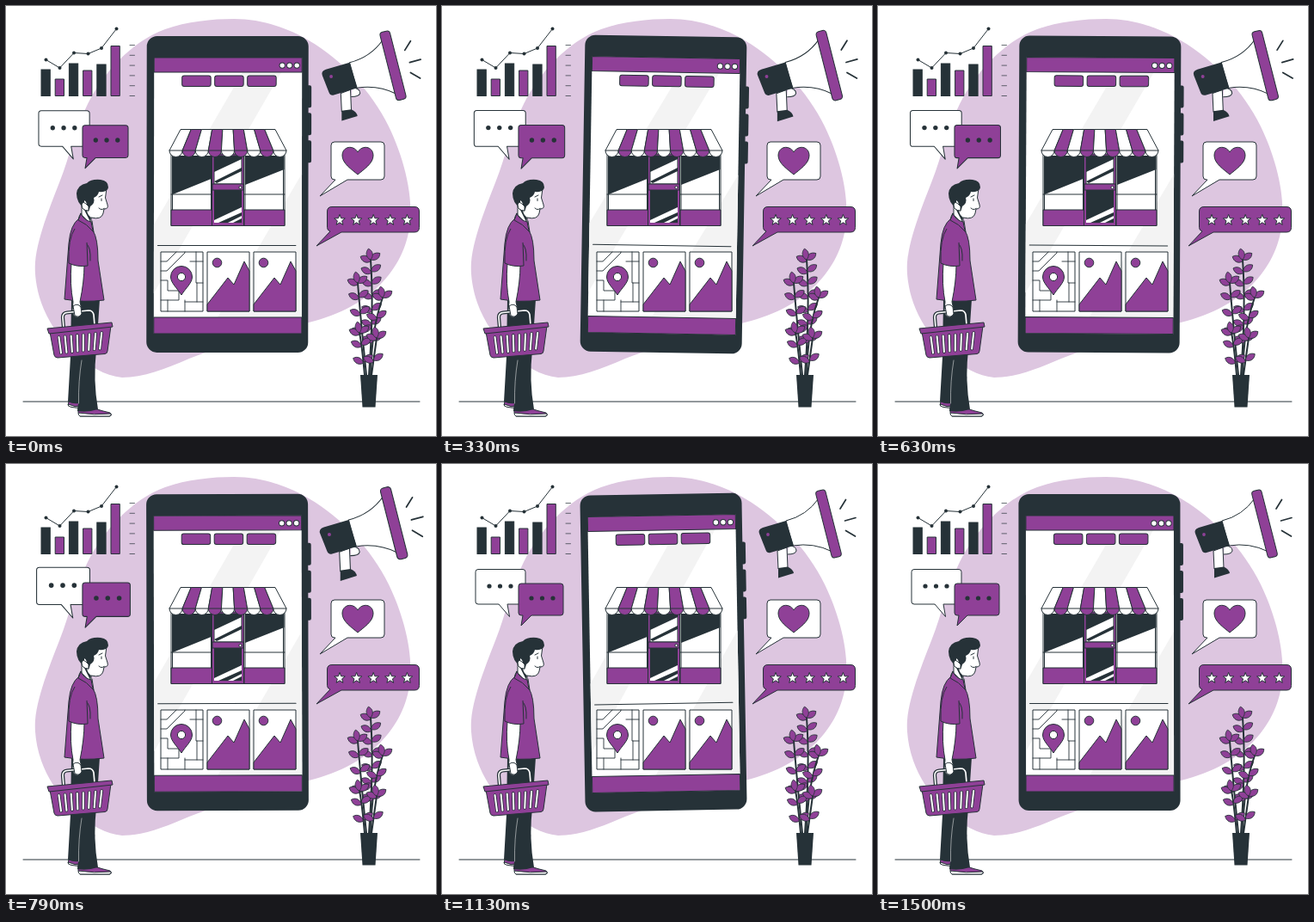
These frames come from a looping animation (500 px wide and 500 px high, 1.54 s). An HTML page:

```html
<!DOCTYPE html>
<html lang="en">
<head>
<meta charset="utf-8">
<title>Mobile shopping</title>
<style>
html, body { margin: 0; width: 100%; height: 100%; overflow: hidden; background: #fff; }
svg { display: block; width: 100vw; height: 100vh; }
.l { fill: none; stroke: #263238; stroke-linecap: round; stroke-linejoin: round; }
.p { fill: #8f4097; stroke: #263238; stroke-linejoin: round; }
.w { fill: #fff; stroke: #263238; stroke-linejoin: round; }
.d { fill: #263238; }
</style>
</head>
<body>
<svg viewBox="0 0 500 500">
  <path fill="#ddc6e0" d="M265 15C300 15 330 27 352 40C390 62 425 99 445 140C461 173 473 215 470 250C466 300 428 350 352 368C300 380 255 394 213 410C185 422 160 432 135 432C95 428 55 385 41 345C35 328 33 310 34 298C37 265 55 225 67 192C77 163 81 142 95 114C113 78 145 42 185 27C210 18 240 15 265 15Z"/>
  <path class="l" d="M20 460H481"/>

  <g id="chart"></g>

  <g id="chat">
    <path class="w" d="M42 122.500H94Q97 122.500 97 125.500V160Q97 163 94 163H76L78.500 177.500L66 163H42Q39 163 39 160V125.500Q39 122.500 42 122.500Z"/>
    <path class="p" d="M92 139H138Q141 139 141 142V173Q141 176 138 176H104L92 188L94 176H92Q89 176 89 173V142Q89 139 92 139Z"/>
  </g>

  <g id="phone">
    <path class="d" d="M349 92h4q2 0 2 2v22q0 2-2 2h-4zM349 124h4q2 0 2 2v22q0 2-2 2h-4zM349 156h4q2 0 2 2v22q0 2-2 2h-4z"/>
    <rect class="d" x="163.500" y="35" width="188" height="368" rx="12"/>
    <rect x="172" y="60" width="172" height="321" fill="#fff"/>
    <path fill="#f3f3f3" d="M275 77H320L172 334V254ZM344 195L235 381H344Z"/>
    <path class="p" d="M172 60H344V77H172ZM172 362H344V381H172Z"/>
    <path class="l" d="M176.500 278.500H337"/>
  </g>

  <g id="store"></g>
  <g id="cards">
    <path class="w" d="M180 286H229V355H180Z"/>
    <path class="l" stroke-width=".9" d="M180 297H187L198 286M180 308H187L208 287V286M180 319H188V331H201V342H180M188 342V355M208 342V355M208 344H229M214 297H229M221 286V322H229M222 322V344"/>
    <path class="p" d="M204 336C199 328 191.500 322 191.500 315A12.500 12.500 0 0 1 216.500 315C216.500 322 209 328 204 336Z"/>
    <circle class="w" cx="204" cy="315" r="4.600"/>
  </g>

  <g id="horn">
    <path class="w" d="M403 95Q412 95 412 101Q411 105 402 105M390 101L391 122L402 121L401 97Z"/>
    <path class="d" d="M391 121L402 119.500Q408 122 409 127L391 132.500Z"/>
    <path class="w" d="M400 66Q424 60 438 40L454 102Q432 91 408 95Z"/>
    <path class="d" d="M373 74L400 66L409 95L382 103Q378 104 376.500 100L369 81Q367 76 373 74Z"/>
    <circle cx="379" cy="82" r="1.900" fill="#8f4097"/>
    <rect class="p" x="-5.800" y="-40" width="11.600" height="80" rx="3.500" transform="translate(449.500 69.500) rotate(-14.300)"/>
    <path class="l" stroke-width="1.700" d="M463 52L469.500 41.500M468.500 66L481 62.500M469.500 77.500L480.500 84"/>
  </g>

  <path class="w" d="M382 158H436Q440 158 440 162V198Q440 202 436 202H397L365 221L383 202H382Q378 202 378 198V162Q378 158 382 158Z"/>
  <path class="p" d="M409 196C402 190 391 183 391 174C391 163 404 161 409 170C414 161 427 163 427 174C427 183 416 190 409 196Z"/>
  <path class="p" d="M379 233.500H475Q480.500 233.500 480.500 239V257.500Q480.500 263 475 263H390L361 279L377 262Q373.500 261 373.500 257.500V239Q373.500 233.500 379 233.500Z"/>
  <g id="stars"></g>

  <g id="plant"></g>

  <g id="man">
    <path class="p" d="M73 460L88 462V467Q75 467 72 464ZM84 467L103 468Q112 471 121 473Q124 476 121 477H86Q83 473 84 467Z"/>
    <path class="w" d="M72.500 463Q80 467 88 465V467Q76 467.500 72.500 465ZM84 473Q102 476 122 474Q123 477 120 477H86Q84 476 84 473Z"/>
    <path class="d" d="M76 341H109L105 400Q101 435 107 469Q94 473 83 471L84 462Q78 463 72 460L75 408Z"/>
    <path class="l" stroke-width=".5" style="stroke:#fff" d="M88 412Q84 436 84.500 462"/>
    <path class="w" d="M88 230V243Q94 248 99 255V246Q111 249 113 241L114 236Q119.500 236 118 231L115.500 223L117 212L96 209Z"/>
    <path class="d" d="M91 237L98 251L99 246Q94 242 94 237Z"/>
    <path class="d" d="M91 235Q82 229 82 218Q83 208 94 206Q99 201 110 202Q119 203 119 211Q118 217 108 216Q107 221 102 223Q104 229 98 233Q97 238 95 239Q95 228 91 226Z"/>
    <path class="w" d="M96 233Q89 225 88 231Q88 238 96 238Z"/>
    <path class="l" d="M108 222L112 220M111 224V226.500M108 235Q111 238 114 235.500"/>
    <path class="p" d="M85 247Q75 254 73 276L68 341Q90 345 114 342L107 296Q107 270 101 261L99 251Q90 249 87 241Z"/>
    <path class="l" d="M87 241Q84 246 84 249Q94 253 102 263L100 250M93 276Q99 280 98 296"/>
    <path class="w" d="M76 299Q74 324 78 344L77 354Q78 362 83 362Q89 361 88 353L86 344Q91 320 91 300Z"/>
    <path class="p" d="M80 259Q72 270 73 299Q83 304 95 302L94 275"/>
    <path class="l" stroke-width="4.200" d="M67 374L66 362Q66 357 71 356.500L96 354Q101 354 102 359L103 371"/>
    <path class="l" stroke-width="1.700" style="stroke:#fff" d="M67 374L66 362Q66 357 71 356.500L96 354Q101 354 102 359L103 371"/>
    <path class="w" d="M78 349Q83 345 87 350L88 358Q85 363 80 360Z"/>
    <path class="p" d="M51 379L122 372L118 401Q118 404 115 404.500L60 409Q57 409 56 406Z"/>
    <path class="p" d="M48 375L123 368L124 373L50 381Z"/>
    <g id="slots"></g>
  </g>
</svg>
<script>
const LOOP = 1540, LEAD = 30;
const $ = id => document.getElementById(id);

function add(parent, tag, cls, attrs) {
  const el = document.createElementNS("http://www.w3.org/2000/svg", tag);
  if (cls) el.setAttribute("class", cls);
  for (const k in attrs) el.setAttribute(k, attrs[k]);
  return $(parent).appendChild(el);
}
const path = (id, cls, d, more) => add(id, "path", cls, { d, ...more });
const dot = (id, cls, cx, cy, r) => add(id, "circle", cls, { cx, cy, r });
const box = (id, cls, x, y, width, height, rx = 0) =>
  add(id, "rect", cls, { x, y, width, height, rx });

function drawChart() {
  [74, 85, 67, 75, 68, 46.5].forEach((y, i) =>
    box("chart", i % 2 ? "p" : "d", 41 + i * 16.2, y, 10.3, 104.5 - y)
      .setAttribute("stroke", "#263238"));
  const pts = [[46.5, 62.5], [62.5, 72], [79, 54.5], [95.5, 55.5], [111, 49], [128.5, 26.5]];
  path("chart", "l", "M" + pts.join("L"));
  pts.forEach(([x, y]) => dot("chart", "d", x, y, 2));
  for (let i = 0; i < 6; i++)
    path("chart", "l", `M144 ${45.5 + i * 11.8}h5.5`, { "stroke-width": 0.7 });
}

function drawChat() {
  for (let i = 0; i < 3; i++) {
    dot("chat", "d", 55 + i * 12.5, 142, 2.6);
    dot("chat", "d", 104 + i * 12.5, 156, 2.6);
  }
}

function drawPhone() {
  for (let i = 0; i < 3; i++) {
    dot("phone", "w", 321 + i * 8.5, 69, 3.2);
    box("phone", "p", 204.5 + i * 38, 81, 33.5, 12.5, 2.5);
  }
}

function drawStore() {
  box("store", "w", 192, 168, 132, 87.5);
  path("store", "d", "M194 174H238.500V201L194 219ZM278 174H323.500V190L278 208Z");
  path("store", "p", "M192 237H239.500V255.500H192ZM277 237H324V255.500H277Z");
  path("store", "l", "M192 219H239M277 219H324M193.500 174V237M238.500 174V237M278 174V237M322.500 174V237");
  box("store", "p", 239.5, 172, 37, 83.5);
  box("store", "w", 242, 174, 32, 33);
  path("store", "d", "M242 174H274V178L242 193ZM242 204L274 188V192L245 206Z");
  box("store", "p", 240, 207, 36, 7);
  box("store", "d", 242, 214, 32, 38);
  path("store", "", "M242 249L274 234V240L247 252H242ZM258 252L274 244V247L264 252Z", { fill: "#fff" });
  dot("store", "w", 272.5, 211, 1.6);
  const n = 9, low = 136 / n, top = 110 / n;
  for (let i = 0; i < n; i++) {
    const a = 190 + i * low, b = 203 + i * top;
    path("store", i % 2 ? "p" : "w",
      `M${b} 143.500h${top}L${a + low} 168a${low / 2} 7.500 0 0 1 ${-low} 0Z`);
  }
  path("store", "l", "M190 168H326");
}

function drawCards() {
  for (const x of [234, 288]) {
    box("cards", "w", x, 286, 49, 69);
    path("cards", "p", `M${x} 355v-8l24-31 7 8 12-27 6 11v47Z`);
    dot("cards", "p", x + 11.5, 298.5, 5.3);
  }
}

function drawStars() {
  for (let i = 0; i < 5; i++) {
    const pts = [];
    for (let k = 0; k < 10; k++) {
      const a = k * Math.PI / 5, r = k % 2 ? 2.8 : 6.6;
      pts.push([388 + i * 19.6 + r * Math.sin(a), 249 - r * Math.cos(a)]);
    }
    path("stars", "w", "M" + pts.join("L") + "Z");
  }
}

function leaf(x, y, deg) {
  path("plant", "p", "M0 0C3-5.500 9-5.500 13-1.500C10 4 4 4 0 0Z",
    { transform: `translate(${x} ${y}) rotate(${deg})`, "stroke-width": 0.8 });
}

// Each stem is a quadratic curve carrying leaf pairs.
function drawPlant() {
  const stems = [
    [422, 429, 428, 350, 424, 295, 6, 0.4],
    [419, 429, 412, 360, 409, 322, 4, 0.4],
    [424, 429, 425, 375, 438, 339, 3, 0.4],
    [417, 429, 414, 395, 411, 380, 3, 0.25],
    [425, 429, 428, 408, 431, 386, 2, 0.4]
  ];
  for (const [x0, y0, cx, cy, x1, y1, pairs, from] of stems) {
    path("plant", "l", `M${x0} ${y0}Q${cx} ${cy} ${x1} ${y1}`, { "stroke-width": 2 });
    for (let i = 0; i < pairs; i++) {
      const t = from + (1 - from) * i / (pairs - 1), s = 1 - t;
      const x = s * s * x0 + 2 * s * t * cx + t * t * x1;
      const y = s * s * y0 + 2 * s * t * cy + t * t * y1;
      leaf(x, y, -28);
      leaf(x, y + 2, 212);
    }
    leaf(x1, y1, -95);
  }
  path("plant", "d", "M412 429H432L429.500 466.500H414.500Z");
}

function drawSlots() {
  for (let i = 0; i < 8; i++) {
    const x = 61.5 + i * 7.1, y = 385 - i * 0.7;
    const d = `M${x} ${y}L${x + 2.5 - i * 0.65} ${y + 18.5}`;
    path("slots", "l", d, { "stroke-width": 3.6 });
    path("slots", "l", d, { "stroke-width": 2, style: "stroke:#fff" });
  }
}

// Linear interpolation through [position, value] keys.
function track(keys, u) {
  let i = 1;
  while (u > keys[i][0]) i++;
  const [a, va] = keys[i - 1], [b, vb] = keys[i];
  return va + (vb - va) * (u - a) / (b - a);
}
const beat = [[0, 1], [0.1, 1.1], [0.3, 1], [0.4, 1], [0.5, 1.1], [0.6, 1], [1, 1]];
const sway = [[0, 0], [0.25, 1], [0.75, -1], [1, 0]];

function pulse(id, x, y, k) {
  $(id).setAttribute("transform", `translate(${x} ${y}) scale(${k}) translate(${-x} ${-y})`);
}

function render(ms) {
  const u = (ms + LEAD) % LOOP / LOOP, k = track(beat, u);
  pulse("chat", 90, 155, k);
  pulse("horn", 424.5, 81, k);
  $("phone").setAttribute("transform", `rotate(${track(sway, u)} 258 219)`);
}

[drawChart, drawChat, drawPhone, drawStore, drawCards, drawStars, drawPlant, drawSlots].forEach(f => f());
render(0);
const start = performance.now();
requestAnimationFrame(function tick() {
  render(performance.now() - start);
  requestAnimationFrame(tick);
});
</script>
</body>
</html>
```
